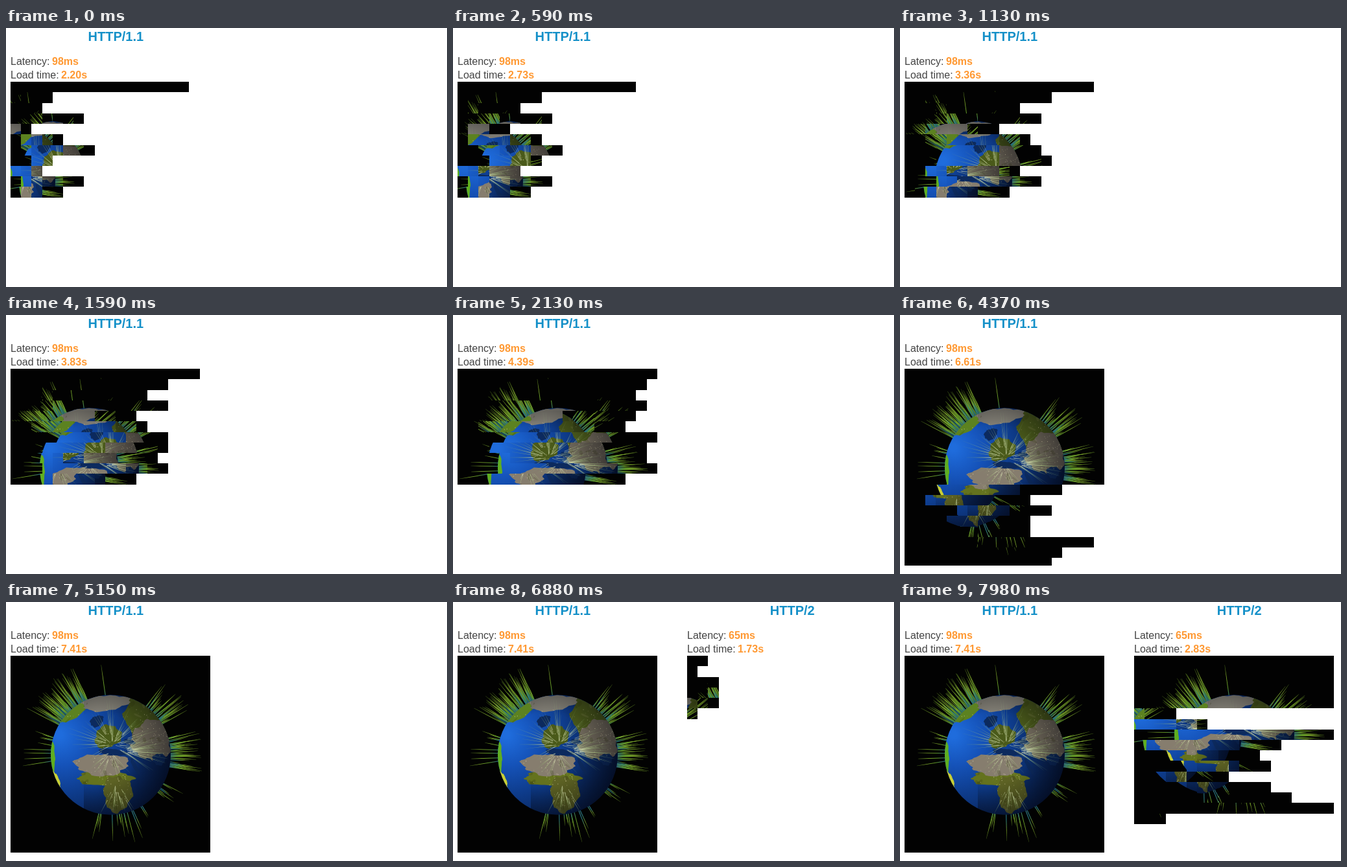
Write an HTML page with a canvas that moves like this. It is 680 px wide and 400 px high and loops after 8000 ms.

```html
<!DOCTYPE html>
<html lang="en">
<head>
<meta charset="utf-8">
<title>Tile loading race</title>
<style>
  html, body { margin: 0; width: 680px; height: 400px; overflow: hidden; background: #fff; }
  canvas, svg { position: absolute; left: 0; top: 0; }
  text { font: 16px "Liberation Sans", Arial, sans-serif; fill: #444; white-space: pre; }
  .title { font-size: 20px; font-weight: bold; fill: #1490c8; text-anchor: middle; }
  .num { font-weight: bold; fill: #ff9933; }
</style>
</head>
<body>
<canvas id="stage" width="680" height="400"></canvas>
<svg width="680" height="400">
  <g>
    <text class="title" x="169.3" y="20">HTTP/1.1</text>
    <text x="7" y="57">Latency: <tspan class="num" x="71">98ms</tspan></text>
    <text x="7" y="78">Load time: <tspan class="num" x="85" id="timeA"></tspan></text>
  </g>
  <g id="second" transform="translate(354)">
    <text class="title" x="169.3" y="20">HTTP/2</text>
    <text x="7" y="57">Latency: <tspan class="num" x="71">65ms</tspan></text>
    <text x="7" y="78">Load time: <tspan class="num" x="85" id="timeB"></tspan></text>
  </g>
</svg>
<script>
const LOOP = 8000, COLS = 19, ROWS = 19;
const LEFT = 7, TOP = 83, W = 308, H = 304, OFFSET = 354;
const byId = id => document.getElementById(id);

// ---------- the globe picture, drawn once ----------
let seed = 11;
const rnd = () => {
  seed = (seed * 1664525 + 1013904223) % 4294967296;
  return seed / 4294967296;
};
const between = (a, b) => a + (b - a) * rnd();

function drawWorld() {
  const cv = document.createElement('canvas');
  cv.width = W; cv.height = H;
  const g = cv.getContext('2d');
  const CX = 161.5, CY = 236, R = 92.5;
  g.fillStyle = '#020202';
  g.fillRect(0, 0, W, H);
  g.translate(-LEFT, -TOP);

  function ray(x, y, angle, len, width, stops) {
    const grad = g.createLinearGradient(0, 0, len, 0);
    stops.forEach((c, i) => grad.addColorStop(i / (stops.length - 1), c));
    g.save();
    g.translate(x, y);
    g.rotate(angle);
    g.fillStyle = grad;
    g.beginPath();
    g.moveTo(0, -width / 2);
    g.lineTo(len, -width / 5);
    g.lineTo(len, width / 5);
    g.lineTo(0, width / 2);
    g.fill();
    g.restore();
  }

  // Rays standing on the limb between two angles
  function fan(n, from, to, minLen, maxLen) {
    for (let i = 0; i < n; i++) {
      const a = between(from, to) * Math.PI / 180;
      const base = R * between(.9, 1), tip = R * (1 + between(minLen, maxLen));
      const tint = rnd() < .3 ? '#2a7f88' : '#5f9626';
      ray(CX + Math.cos(a) * base, CY + Math.sin(a) * base, a + between(-.06, .06), tip - base,
        1.3, ['#24607a', tint, '#7ea62a', '#334a12']);
    }
  }
  fan(100, 208, 247, .12, .6);
  fan(9, 172, 197, .15, .48);
  fan(1, 265, 265, .51, .51);
  fan(30, -56, -31, .1, .56);
  fan(50, -17, 13, .15, .56);
  fan(9, 25, 60, .08, .42);
  fan(14, 66, 102, .12, .54);

  g.save();
  g.beginPath();
  g.arc(CX, CY, R, 0, 7);
  g.clip();
  const sea = g.createRadialGradient(82, 205, 5, 90, 212, 170);
  ['#1f6cdc', '#1552b8', '#0e3c8c', '#0a2860', '#071a40'].forEach((c, i) => sea.addColorStop(i / 4, c));
  g.fillStyle = sea;
  g.fillRect(60, 140, 200, 200);

  // An ellipse with a wavy coast
  function blob(color, x, y, rx, ry, turn = 0) {
    const p = new Path2D();
    for (let a = 0; a < 6.28; a += .13) {
      const k = 1 + .08 * Math.sin(3 * a + x) + .06 * Math.sin(8 * a + y) + .03 * Math.sin(17 * a);
      const u = Math.cos(a) * rx * k, v = Math.sin(a) * ry * k;
      p.lineTo(x + u * Math.cos(turn) - v * Math.sin(turn), y + u * Math.sin(turn) + v * Math.cos(turn));
    }
    p.closePath();
    g.fillStyle = color;
    g.fill(p);
    return p;
  }

  const navy = '#0c2a5e';
  blob('#5fae20', 68, 240, 8, 26);
  blob('#c9d034', 77, 276, 5, 16, -.35);
  const lands = [
    blob('#5c8220', 104, 171, 26, 8, -.6),
    blob('#47561a', 222, 178, 44, 34, .8),
    blob('#4a5a1a', 157, 208, 21, 17, -.4),
    blob('#807d74', 153, 156, 37, 12, -.08),
    blob('#6e675a', 224, 214, 30, 32, -.4),
    blob('#64721e', 152, 272, 43, 11),
    blob('#5d6224', 172, 296, 22, 28),
    blob('#867d6e', 148, 251, 41, 17)
  ];
  blob(navy, 140, 184, 11, 8, -.6);
  blob(navy, 165, 232, 23, 5, .1);
  blob(navy, 190, 216, 9, 4, .2);
  blob(navy, 199, 254, 3, 15, -.5);
  blob(navy, 236, 243, 10, 9);

  // Mottled ground and city lights
  for (const path of lands) {
    g.save();
    g.clip(path);
    for (let k = 0; k < 60; k++) {
      g.fillStyle = rnd() < .5 ? 'rgba(40,48,8,.2)' : 'rgba(176,168,130,.14)';
      g.beginPath();
      g.ellipse(between(84, 255), between(143, 325), between(2, 7), between(1, 4), rnd() * 3, 0, 7);
      g.fill();
    }
    for (let k = 0; k < 420; k++) {
      g.fillStyle = `rgba(255,246,200,${between(.15, .75)})`;
      g.fillRect(between(88, 254), between(165, 324), 1, 1);
    }
    g.restore();
  }

  const shade = g.createRadialGradient(145, 225, 55, 150, 228, 112);
  shade.addColorStop(0, 'rgba(0,0,0,0)');
  shade.addColorStop(1, 'rgba(0,0,10,.5)');
  g.fillStyle = shade;
  g.fillRect(120, 140, 140, 200);
  g.restore();

  // Pale rays spreading over the near side
  function spray(n, x, y, spread, from, to, minLen, maxLen) {
    for (let i = 0; i < n; i++) {
      const a = between(from, to) * Math.PI / 180, skip = between(4, spread);
      ray(x + Math.cos(a) * skip, y + Math.sin(a) * skip, a, between(minLen, maxLen), .8,
        ['rgba(225,230,190,.6)', 'rgba(160,190,120,.5)', 'rgba(120,160,110,.2)']);
    }
  }
  spray(58, 164, 220, 26, 140, 400, 18, 52);
  spray(30, 182, 230, 18, -40, 40, 28, 60);
  spray(14, 162, 232, 18, 40, 170, 18, 42);
  spray(22, 170, 280, 30, 50, 130, 8, 30);
  return cv;
}

// ---------- timing ----------
function lerp(keys, t) {
  if (t <= keys[0][0]) return keys[0][1];
  for (let i = 1; i < keys.length; i++) {
    const [t0, v0] = keys[i - 1], [t1, v1] = keys[i];
    if (t <= t1) return v0 + (v1 - v0) * (t - t0) / (t1 - t0);
  }
  return keys[keys.length - 1][1];
}
const clockA = [[0, 2.2], [1130, 3.36], [2130, 4.39], [3130, 5.44], [4360, 6.61], [5150, 7.41]];
const clockB = [[6160, 1.01], [6880, 1.73], [7980, 2.83]];

// Steady refreshes while the first picture loads, uneven ones later
const lateSteps = [5150, 6160, 6880, 7030, 7180, 7350, 7430, 7515, 7600, 7680, 7910, 7980];
function stepAt(t) {
  if (t < 70) return 0;
  return lateSteps.filter(s => s <= t).pop() || Math.min(4975, Math.floor((t + 24) / 76.9) * 76.9 - 24);
}

// ---------- how many tiles each row holds at a few moments ----------
const topCounts = [
  [17, 4, 3, 7, 2, 5, 8, 4, 3, 7, 5],
  [18, 14, 11, 13, 9, 12, 13, 14, 11, 13, 10],
  [19, 18, 17, 18, 17, 16, 19, 18, 18, 19, 16]
];
const lowCounts = [[9, 5, 3, 5, 6, 9, 5, 3], [15, 12, 15, 12, 12, 18, 15, 14]];
const firstCounts = [2, 1, 3, 3, 3, 1];
const lastCounts = [4, 0, 0, 7, 19, 14, 12, 13, 9, 13, 15, 19, 3, 0];

function keysA(r) {
  if (r < 11) return [...topCounts.map((row, i) => [[0, 1130, 2130][i], row[r]]), [2500, COLS]];
  const [mid, late] = lowCounts.map(row => row[r - 11]);
  return [[2330, 0], [3130, mid], [4370, late], [5150, COLS]];
}
function keysB(r) {
  const first = firstCounts[r] || 0;
  const end = r < 5 ? [7200 + 100 * r, COLS] : [7980, lastCounts[r - 5]];
  const wait = r < 5 ? 6880 : 7200 + 60 * Math.max(0, r - 8);
  return [[6800, 0], [6880, first], [wait, first], end];
}

// Tiles of a row arrive in a shuffled order
const noise = (r, c, salt) => {
  const v = Math.sin(r * 12.9898 + c * 78.233 + salt) * 43758.5453;
  return v - Math.floor(v);
};
const makeRows = (keysOf, salt) => Array.from({ length: ROWS }, (_, r) => ({
  keys: keysOf(r),
  order: [...Array(COLS).keys()].sort((a, b) => noise(r, a, salt) - noise(r, b, salt))
}));
const rowsA = makeRows(keysA, 1), rowsB = makeRows(keysB, 5);

// ---------- painting ----------
const ctx = byId('stage').getContext('2d');
const world = drawWorld();
const colX = c => Math.round(LEFT + 16.2 * c);
const rowY = r => Math.round(83.13 + 16.23 * r);

// Missing tiles take no room: rows close up to the left, empty rows vanish
function paint(rows, t, dx) {
  let line = 0;
  rows.forEach(({ keys, order }, r) => {
    const count = Math.floor(lerp(keys, t) + .1);
    if (!count) return;
    const y = rowY(line), sy = rowY(r) - TOP;
    const h = Math.min(rowY(line + 1) - y, H - sy);
    order.slice(0, count).sort((a, b) => a - b).forEach((c, k) => {
      const x = colX(k), w = colX(k + 1) - x;
      const sx = Math.min(colX(c) - LEFT, W - w);
      ctx.drawImage(world, sx, sy, w, h, x + dx, y, w, h);
    });
    line++;
  });
}

let last = -1;
function render(t) {
  const step = stepAt(t);
  if (step === last) return;
  last = step;
  ctx.clearRect(0, 0, 680, 400);
  paint(rowsA, step, 0);
  paint(rowsB, step, OFFSET);
  byId('timeA').textContent = lerp(clockA, step).toFixed(2) + 's';
  byId('timeB').textContent = lerp(clockB, step).toFixed(2) + 's';
  byId('second').style.display = step >= 6160 ? '' : 'none';
}

const start = performance.now();
function tick() {
  render((performance.now() - start) % LOOP);
  requestAnimationFrame(tick);
}
tick();
</script>
</body>
</html>
```
